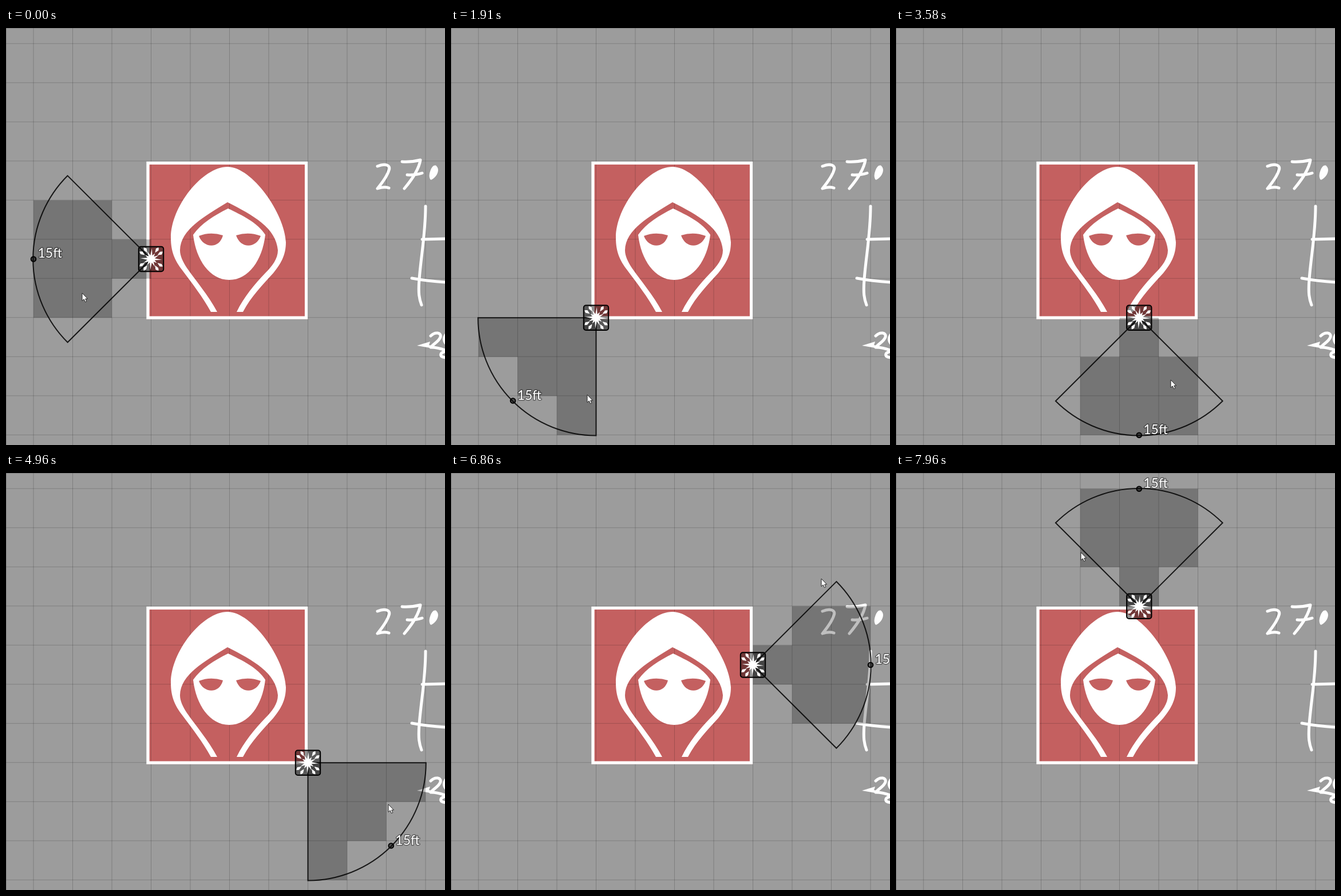
Recreate the animation shown at these times as an HTML page with a canvas. Size 767x730 px, loop 8000 ms.

```html
<!DOCTYPE html>
<html lang="en">
<head>
<meta charset="utf-8">
<title>Cone template around a token</title>
<style>
  html, body { margin: 0; width: 100%; height: 100%; overflow: hidden; background: #9c9c9c; }
  canvas { display: block; }
</style>
</head>
<body>
<canvas id="stage" width="767" height="730"></canvas>
<script>
const ctx = document.getElementById('stage').getContext('2d');
const W = 767, H = 730, LOOP = 8000, START = 300, STEP = 69.64;
const CELL = 68.5, CX = 390.5, CY = 370, RANGE = CELL * 3;
const RED = '#c46060';

// Snap points: [step, x, y] in cells from the token's centre
const snaps = [
  [0, -2, .5], [9, -2, 1.5], [19, -2, 2], [29, -1.5, 2], [38, -.5, 2],
  [46, .5, 2], [55, 1.5, 2], [63, 2, 2], [74, 2, 1.5], [81, 2, .5],
  [89, 2, -.5], [96, 2, -1.5], [101, 2, -2], [106, 1.5, -2], [110, .5, -2]
];

// Pointer path: [step, x, y]
const path = [
  [0, 133, 464], [6, 149, 545], [12, 171, 622], [14, 177, 629], [24, 238, 642],
  [34, 317, 618], [48, 480, 616], [58, 588, 614], [68, 668, 580],
  [81, 716, 405], [95, 647, 185], [103, 505, 128], [111, 323, 139]
];

const hood = new Path2D(`M387 243 C343 243 288 313 288 367 C288 392 295 407 308 424
  C326 448 343 470 358 497 H369 C353 467 332 443 316 420 C309 409 304 399 304 389
  C305 353 345 331 387 305 C432 328 472 350 475 389 C475 404 465 417 453 429
  C435 448 416 470 403 497 H414 C428 470 449 449 467 429 C480 413 489 398 489 375
  C487 325 430 243 387 243 Z`);
const face = new Path2D(`M388 316 C364 328 341 342 327 362 C332 406 356 441 390 441
  C424 441 448 406 453 362 C440 341 411 327 388 316 Z`);
const eyes = new Path2D(`M337 364 Q357 356 379 363 C373 387 345 386 337 364 Z
  M402 363 Q424 356 445 364 C437 386 410 387 402 363 Z`);
const scrawl = new Path2D(`M649 242 C661 237 673 239 669 249 C666 259 658 270 649 281 Q661 277 669 280
  M692 234 Q709 235 724 231 C721 250 707 268 696 281 M701 257 Q715 258 727 254
  M733 312 C733 360 725 400 722 440 C720 465 722 474 726 485
  M727 370 L767 369 M709 438 Q736 443 767 445
  M742 539 C750 531 761 533 759 541 C757 548 747 553 742 559 Q754 559 767 564
  M769 536 Q762 545 769 553 M769 566 C757 568 756 576 769 577`);
const loop = new Path2D('M743 263 C740 257 746 242 750 243 C755 248 752 257 743 263 Z');
const dash = new Path2D('M718 556 L741 549 L739 555 L760 560 L741 560 Z');
const arrow = new Path2D('M0 0 V13.5 L3.2 10.8 L5.4 15.6 L7.8 14.6 L5.7 10 H9.6 Z');

// Spiky star with a pair of loose shards towards each corner
function star() {
  const p = new Path2D();
  const polar = (r, deg) => [r * Math.cos(deg * Math.PI / 180), r * Math.sin(deg * Math.PI / 180)];
  for (let i = 0; i < 24; i++) {
    p.lineTo(...polar(i % 2 ? 6.5 : [19, 12, 15][i / 2 % 3], i * 15 + 4));
  }
  p.closePath();
  for (let i = 0; i < 8; i++) {
    const deg = 45 + (i >> 1) * 90 + (i % 2 ? 13 : -13);
    p.moveTo(...polar(13, deg));
    p.lineTo(...polar(20, deg + 9));
    p.lineTo(...polar(25, deg));
    p.lineTo(...polar(20, deg - 7));
    p.closePath();
  }
  return p;
}
const burst = star();

function fill(shape, color) {
  ctx.fillStyle = color;
  ctx.fill(shape);
}

function drawGrid() {
  ctx.fillStyle = 'rgba(0,0,0,.19)';
  ctx.fillRect(0, 0, 1, H);
  ctx.fillRect(0, 0, W, 1);
  for (let x = 47.5; x < W; x += CELL) ctx.fillRect(x, 0, 1, H);
  for (let y = 26.8; y < H; y += CELL) ctx.fillRect(0, y, W, 1);
}

function drawMap() {
  ctx.fillStyle = '#9c9c9c';
  ctx.fillRect(0, 0, W, H);
  ctx.fillStyle = RED;
  ctx.fillRect(246, 234, 281, 276);
  drawGrid();

  ctx.strokeStyle = '#fff';
  ctx.lineWidth = 5.3;
  ctx.strokeRect(248, 236.4, 276.6, 270.8);
  fill(hood, '#fff');
  fill(face, '#fff');
  fill(eyes, RED);

  ctx.lineWidth = 5;
  ctx.lineCap = ctx.lineJoin = 'round';
  ctx.stroke(scrawl);
  ctx.stroke(loop);
  fill(loop, '#fff');
  fill(dash, '#fff');
  ctx.lineCap = 'butt';
  ctx.lineJoin = 'miter';
}

function drawCells(x, y, angle, corner) {
  ctx.save();
  ctx.translate(x, y);
  ctx.rotate(corner ? angle - Math.PI / 4 : angle);
  ctx.beginPath();
  if (corner) {
    for (let i = 0; i < 3; i++) ctx.rect(0, i * CELL, (3 - i) * CELL, CELL);
  } else {
    ctx.rect(0, -CELL / 2, CELL, CELL);
    ctx.rect(CELL, -CELL * 1.5, CELL * 2, CELL * 3);
  }
  ctx.fillStyle = 'rgba(0,0,0,.25)';
  ctx.fill();
  ctx.restore();
}

function drawIcon(x, y) {
  ctx.save();
  ctx.translate(x, y);
  ctx.beginPath();
  ctx.roundRect(-21.7, -21.7, 43.4, 43.4, 4);
  ctx.fillStyle = 'rgba(0,0,0,.43)';
  ctx.fill();
  ctx.strokeStyle = '#000';
  ctx.lineWidth = 2;
  ctx.stroke();
  ctx.beginPath();
  ctx.rect(-20, -20, 40, 40);
  ctx.clip();
  fill(burst, '#fff');
  ctx.restore();
}

function drawTemplate(gx, gy) {
  const x = CX + gx * CELL, y = CY + gy * CELL + .2;
  const corner = Math.abs(gx) === Math.abs(gy);
  const angle = Math.atan2(Math.trunc(gy / 2), Math.trunc(gx / 2));
  const hx = x + RANGE * Math.cos(angle), hy = y + RANGE * Math.sin(angle);

  drawCells(x, y, angle, corner);
  ctx.beginPath();
  ctx.moveTo(x, y);
  ctx.arc(x, y, RANGE + .8, angle - Math.PI / 4, angle + Math.PI / 4);
  ctx.closePath();
  ctx.strokeStyle = 'rgba(0,0,0,.85)';
  ctx.lineWidth = 2;
  ctx.stroke();
  drawIcon(x, y);

  ctx.beginPath();
  ctx.arc(hx, hy, 4.3, 0, Math.PI * 2);
  ctx.fillStyle = 'rgba(0,0,0,.5)';
  ctx.fill();
  ctx.strokeStyle = '#000';
  ctx.stroke();

  ctx.save();
  ctx.font = '23px Lato, "Open Sans", sans-serif';
  ctx.lineJoin = 'round';
  ctx.lineWidth = 3;
  ctx.strokeStyle = 'rgba(0,0,0,.4)';
  ctx.strokeText('15ft', hx + 7.5, hy - 2);
  ctx.fillStyle = '#fff';
  ctx.fillText('15ft', hx + 7.5, hy - 2);
  ctx.restore();
}

// Smooth curve through the path points
function pointer(n) {
  let i = 0;
  while (i < path.length - 2 && path[i + 1][0] <= n) i++;
  const a = path[i], b = path[i + 1];
  const p = path[i - 1] || a, q = path[i + 2] || b;
  const span = b[0] - a[0], u = (n - a[0]) / span, v = 1 - u;
  return [1, 2].map(k => {
    const m0 = (b[k] - p[k]) / (b[0] - p[0]) * span;
    const m1 = (q[k] - a[k]) / (q[0] - a[0]) * span;
    return a[k] * (1 + 2 * u) * v * v + m0 * u * v * v
      + b[k] * u * u * (3 - 2 * u) - m1 * u * u * v;
  });
}

function drawPointer(n) {
  const [x, y] = pointer(n);
  ctx.save();
  ctx.translate(x, y);
  fill(arrow, '#fff');
  ctx.strokeStyle = '#222';
  ctx.lineWidth = 1;
  ctx.stroke(arrow);
  ctx.restore();
}

function draw(now) {
  const t = now % LOOP;
  const n = Math.min(111, Math.max(0, Math.floor((t - START) / STEP + 1.1)));
  const [, gx, gy] = snaps.findLast(s => s[0] <= n);
  drawMap();
  drawTemplate(gx, gy);
  drawPointer(n);
}

const t0 = performance.now();
function tick() {
  draw(performance.now() - t0);
  requestAnimationFrame(tick);
}
tick();
</script>
</body>
</html>
```
